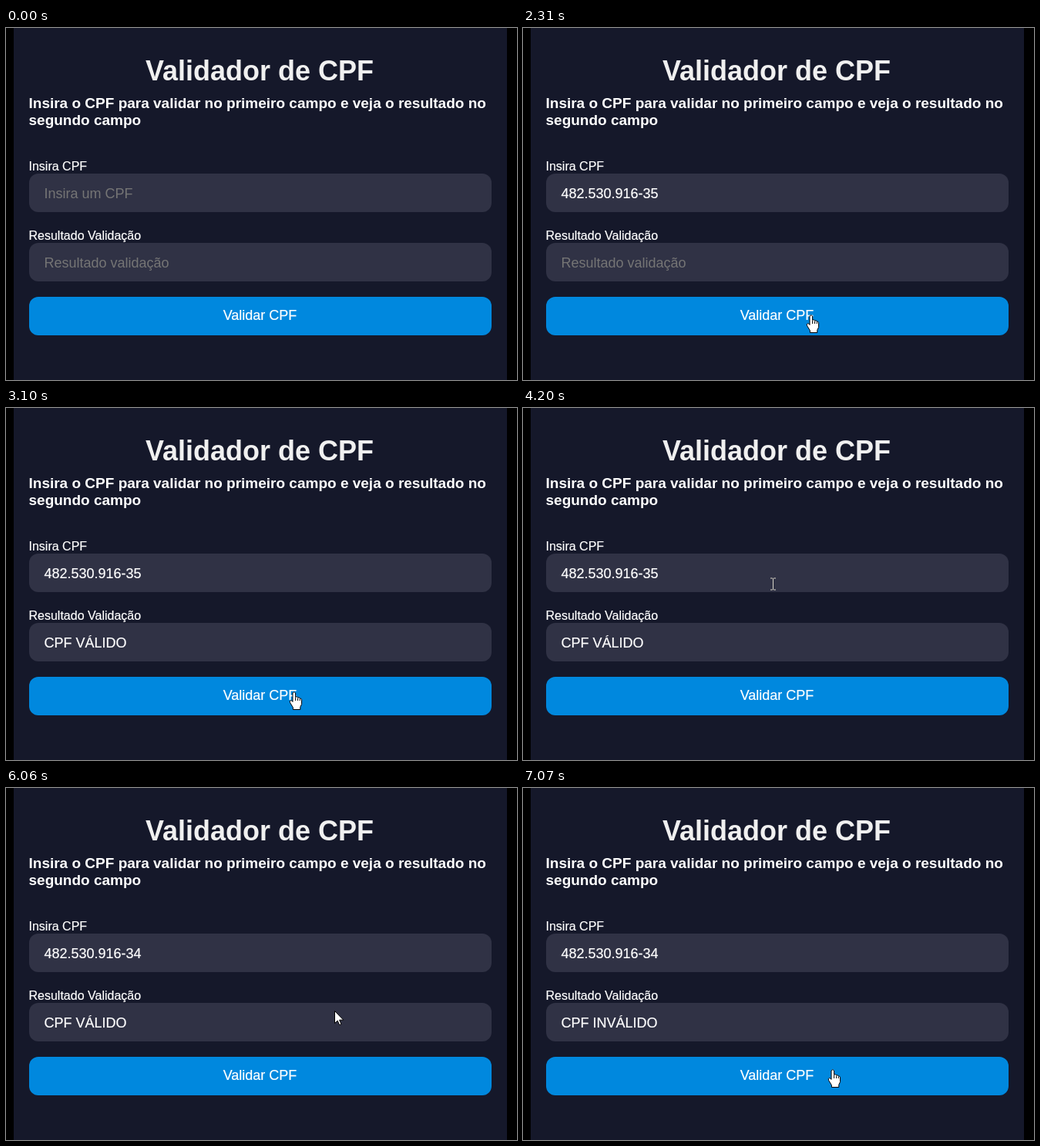
Write an HTML page that moves like this. It is 663 px wide and 457 px high and loops after 8000 ms.

```html
<!DOCTYPE html>
<html lang="pt-BR">
<head>
<meta charset="utf-8">
<title>Validador de CPF</title>
<style>
  html, body { margin: 0; width: 100%; height: 100%; overflow: hidden; background: #000; }
  svg { display: block; width: 100%; height: 100%; font: 18px "Liberation Sans", Arial, sans-serif; color: #fff; }
  text { fill: currentColor; stroke: currentColor; stroke-width: .2; }
  .title { font-size: 36px; font-weight: bold; color: #f0f0f0; stroke: none; }
  .sub { font-size: 19px; font-weight: bold; stroke: none; }
  .label { font-size: 16px; }
  .hint { color: #757575; stroke: none; }
  .box { fill: #303245; }
  .pointer { fill: #fff; stroke: #000; stroke-linejoin: round; }
</style>
</head>
<body>
<svg viewBox="0 0 663 457">
  <rect width="663" height="457" fill="#000"/>
  <rect x="10" width="640" height="457" fill="#15182a"/>
  <text class="title" x="329" y="68" text-anchor="middle">Validador de CPF</text>
  <text class="sub" x="29.5" y="104">Insira o CPF para validar no primeiro campo e veja o resultado no</text>
  <text class="sub" x="29.5" y="126">segundo campo</text>
  <text class="label" x="29.5" y="185">Insira CPF</text>
  <rect class="box" x="30" y="189" width="600" height="50" rx="12"/>
  <text id="entry" x="49.5" y="221"></text>
  <text class="label" x="29.5" y="275">Resultado Validação</text>
  <rect class="box" x="30" y="279" width="600" height="50" rx="12"/>
  <text id="result" x="49.5" y="311"></text>
  <rect id="button" x="30" y="349" width="600" height="50" rx="12"/>
  <text x="329.5" y="379" text-anchor="middle">Validar CPF</text>
  <rect id="caret" y="205" width="1" height="20" fill="#fff"/>
  <g id="cursor">
    <path id="arrow" class="pointer" d="M.5 .5V16.5L4.2 13.1 6.7 18.6 9 17.6 6.6 12.2H11.8Z"/>
    <g id="hand" class="pointer">
      <path d="M-2 2Q-.2-.8 1.6 2V7.2Q3.6 5.8 4.6 8 6.6 7 7.3 9.1 9.2 8.6 9.6 10.8V16.5L7.8 20.2V23.5H-1.6V20.8L-5.4 14.6Q-6.3 12.2-4.8 11.6-3.4 11.3-2 13.4Z"/>
      <path d="M1.6 7.5V12M4.6 8.5V12M7.3 9.5V12" fill="none"/>
    </g>
    <path id="beam" d="M-3.5-7.5H-1.2L0-6.7 1.2-7.5H3.5M0-6.7V6.7M-3.5 7.5H-1.2L0 6.7 1.2 7.5H3.5" transform="translate(.5 .5)" fill="none" stroke="#d8d5c8"/>
  </g>
</svg>
<script>
const LOOP = 8000, BLINK = 530;
const el = id => document.getElementById(id);
const [entry, result, button, caret, cursor, arrow, hand, beam] =
  ['entry', 'result', 'button', 'caret', 'cursor', 'arrow', 'hand', 'beam'].map(el);

const NUMBER = '482.530.916-3';

// What the user does; "focus" is the moment the caret starts to blink
const actions = [
  { at: 0, entry: '', result: '', pressed: false, focus: null },
  { at: 1300, focus: 1300 },
  { at: 1680, entry: NUMBER + '5', focus: 1680 },
  { at: 2440, pressed: true, focus: null },
  { at: 2510, pressed: false, result: 'CPF VÁLIDO' },
  { at: 3650, focus: 3650 },
  { at: 5130, entry: NUMBER, focus: 5130 },
  { at: 5260, entry: NUMBER + '4', focus: 5260 },
  { at: 7000, pressed: true, focus: null },
  { at: 7070, pressed: false, result: 'CPF INVÁLIDO' }
];

// Pointer strokes: eased quadratic curves from a to b, bent by c
const strokes = [
  { start: 610, end: 1430, a: [582, 450], c: [345, 290], b: [326, 223] },
  { start: 1680, end: 2310, a: [326, 223], c: [362, 320], b: [374, 372] },
  { start: 3100, end: 3650, a: [374, 368], c: [356, 295], b: [337, 231] },
  { start: 3790, end: 4200, a: [337, 231], c: [330, 230], b: [324, 228] },
  { start: 5720, end: 6400, a: [324, 228], c: [489, 281], b: [402, 365] }
];

const ease = f => f * f * (3 - 2 * f);

function pointer(t) {
  const s = strokes.filter(s => s.start <= t).pop();
  if (!s) return null;
  const f = ease(Math.min(1, (t - s.start) / (s.end - s.start))), g = 1 - f;
  return s.a.map((a, i) => Math.round(g * g * a + 2 * g * f * s.c[i] + f * f * s.b[i]));
}

function write(node, text, hint) {
  const value = text || hint;
  if (node.textContent !== value) node.textContent = value;
  node.setAttribute('class', text ? '' : 'hint');
}

const show = (node, on) => node.setAttribute('visibility', on ? 'visible' : 'hidden');

function draw(t) {
  const state = Object.assign({}, ...actions.filter(a => a.at <= t));
  write(entry, state.entry, 'Insira um CPF');
  write(result, state.result, 'Resultado validação');
  button.setAttribute('fill', state.pressed ? '#007cca' : '#0088de');

  show(caret, state.focus !== null && (t - state.focus) % (2 * BLINK) < BLINK);
  caret.setAttribute('x', 50 + (state.entry ? Math.floor(entry.getComputedTextLength()) : 0));

  const p = pointer(t);
  const inside = top => p && p[0] >= 30 && p[0] < 630 && p[1] >= top && p[1] < top + 50;
  const onEntry = inside(189), onButton = inside(349);
  show(beam, onEntry);
  show(hand, onButton);
  show(arrow, p && !onEntry && !onButton);
  if (p) cursor.setAttribute('transform', `translate(${p})`);
}

const origin = performance.now();
function tick() {
  draw((performance.now() - origin) % LOOP);
  requestAnimationFrame(tick);
}
draw(0);
requestAnimationFrame(tick);
</script>
</body>
</html>
```
